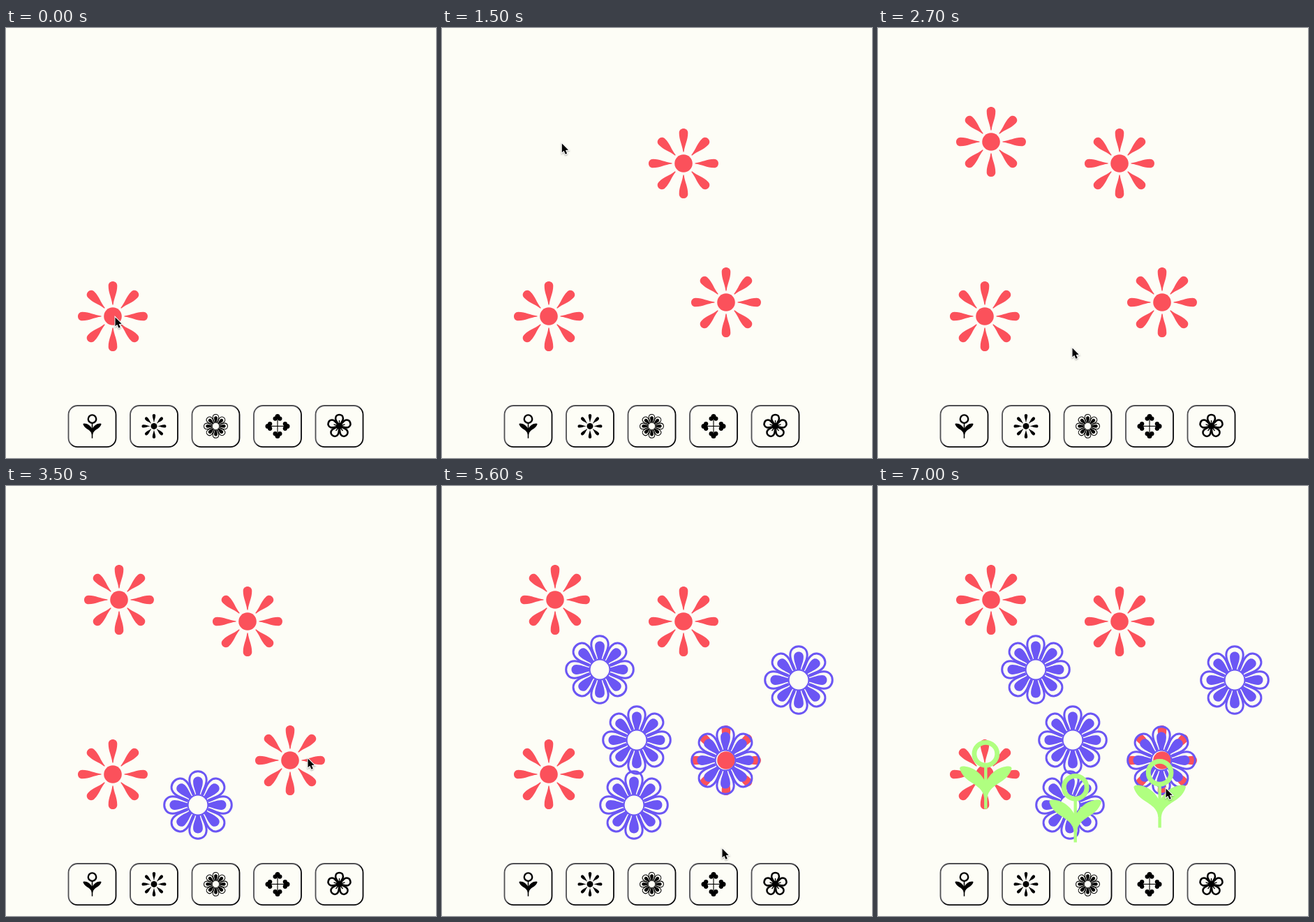
Write an HTML page with a canvas that moves like this. It is 616 px wide and 616 px high and loops after 7100 ms.

```html
<!DOCTYPE html>
<html lang="en">
<head>
<meta charset="utf-8">
<title>Flower stamps</title>
<style>
  html, body { margin: 0; width: 100%; height: 100%; overflow: hidden; background: #fdfdf6; }
  canvas { display: block; }
</style>
</head>
<body>
<canvas id="stage" width="616" height="616"></canvas>
<script>
const ctx = document.getElementById('stage').getContext('2d');
const LOOP = 7100, STEP = 100, DWELL = 150;
const PAPER = '#fdfdf6';

function disc(x, y, r) {
  ctx.beginPath();
  ctx.arc(x, y, r, 0, Math.PI * 2);
  ctx.fill();
}

function ring(x, y, r, width) {
  ctx.lineWidth = width;
  ctx.beginPath();
  ctx.arc(x, y, r, 0, Math.PI * 2);
  ctx.stroke();
}

function around(count, draw) {
  for (let i = 0; i < count; i++) {
    ctx.save();
    ctx.rotate(i * Math.PI * 2 / count);
    draw();
    ctx.restore();
  }
}

// Upright petal: `foot` wide at radius `base`, rounded at radius `tip`.
function petal(base, tip, half, foot) {
  const shoulder = tip - half, bend = (shoulder - base) * 0.4;
  const cap = tip + half / 3;
  ctx.beginPath();
  ctx.moveTo(-foot, -base);
  ctx.bezierCurveTo(-foot - half * 0.2, -base - bend, -half, -shoulder + bend, -half, -shoulder);
  ctx.bezierCurveTo(-half, -cap, half, -cap, half, -shoulder);
  ctx.bezierCurveTo(half, -shoulder + bend, foot + half * 0.2, -base - bend, foot, -base);
}

function burst() {
  disc(0, 0, 12.8);
  around(8, () => { petal(16.5, 50, 6.3, 0.6); ctx.fill(); });
}

function daisy() {
  ring(0, 0, 14.4, 2);
  around(8, () => {
    petal(14.5, 40.5, 6.9, 2.6);
    ctx.fill();
    ctx.lineWidth = 3;
    petal(14.5, 48.3, 12.2, 5.4);
    ctx.stroke();
  });
}

function sprout() {
  ring(0, -29.3, 16.4, 6.8);
  ctx.fillRect(-2.2, -13, 4.4, 62.5);
  for (const side of [-1, 1]) {
    ctx.save();
    ctx.scale(side, 1);
    ctx.beginPath();
    ctx.moveTo(0, 12);
    ctx.bezierCurveTo(6, -2, 19, -11.5, 33, -11.5);
    ctx.quadraticCurveTo(39, -11, 36.5, -6);
    ctx.bezierCurveTo(31, 8, 19, 11, 9, 20);
    ctx.quadraticCurveTo(3, 26, 2.2, 34);
    ctx.lineTo(0, 34);
    ctx.fill();
    ctx.restore();
  }
}

function cross() {
  around(4, () => {
    ctx.fillRect(-1.6, -36, 3.2, 36);
    disc(0, -40, 10);
    for (const side of [-1, 1]) disc(side * 9.5, -31, 9);
  });
}

function florette() {
  disc(0, 0, 13);
  ctx.lineWidth = 7.5;
  around(5, () => {
    ctx.fillRect(-2, -24, 4, 20);
    petal(9, 47, 15.5, 6);
    ctx.stroke();
  });
}

function stamp(shape, x, y, color, scale = 1) {
  ctx.save();
  ctx.translate(x, y);
  ctx.scale(scale, scale);
  ctx.fillStyle = ctx.strokeStyle = color;
  shape();
  ctx.restore();
}

const buttons = [sprout, burst, daisy, cross, florette];
const buttonX = i => 123.5 + i * 88.5;
const BUTTON_Y = 570.4;

function drawButtons() {
  buttons.forEach((icon, i) => {
    const x = buttonX(i), y = BUTTON_Y;
    const bevel = ctx.createLinearGradient(x - 9, y - 10, x + 9, y + 10);
    bevel.addColorStop(0.4, '#505054');
    bevel.addColorStop(0.6, '#08080a');
    ctx.strokeStyle = bevel;
    ctx.lineWidth = 1.8;
    ctx.beginPath();
    ctx.roundRect(x - 34, y - 29.4, 68, 59.2, 13);
    ctx.stroke();
    stamp(icon, x, y, '#000', 0.35);
  });
}

const inks = new Map([[burst, '#fb515b'], [daisy, '#6b56f4'], [sprout, '#b0ff80']]);

// Pointer stops: arrival time, place, and the shape left there, if any.
const stops = [
  [-DWELL, 153, 413, burst],
  [450, 407, 393, burst],
  [950, 346, 194, burst],
  [1550, 162, 163, burst],
  [2250, buttonX(2), BUTTON_Y],
  [2650, 275, 457, daisy],
  [3450, 429, 389],
  [3650, 406, 393, daisy],
  [4100, 226, 263, daisy],
  [4650, 511, 278, daisy],
  [5150, 279, 364, daisy],
  [5550, 398, 518],
  [5850, buttonX(0), BUTTON_Y],
  [6150, 154.3, 413, sprout],
  [6450, 282.7, 461, sprout],
  [6750, 403.6, 440, sprout],
  [7000, 409, 432]
];

function pointerAt(t) {
  const last = stops.findLastIndex(stop => stop[0] <= t);
  const [t0, x0, y0] = stops[last];
  const [t1, x1, y1] = stops[last + 1] ?? [LOOP, x0, y0];
  const leave = Math.min(t0 + DWELL, t1 - STEP);
  const u = Math.max(0, (t - leave) / (t1 - leave));
  const ease = u * u * (3 - 2 * u);
  return [x0 + (x1 - x0) * ease + 3.5, y0 + (y1 - y0) * ease + 1.5];
}

const arrow = new Path2D('M0 0V12.8L2.8 10.2L5 15.3L7.3 14.3L5.2 9.4L9.2 9.3Z');

function drawPointer(x, y) {
  ctx.save();
  ctx.translate(x, y);
  ctx.shadowColor = 'rgba(0,0,0,0.35)';
  ctx.shadowBlur = 2;
  ctx.shadowOffsetY = 1;
  ctx.strokeStyle = '#fff';
  ctx.lineWidth = 2;
  ctx.stroke(arrow);
  ctx.shadowColor = 'transparent';
  ctx.fillStyle = '#000';
  ctx.fill(arrow);
  ctx.restore();
}

function render(t) {
  ctx.fillStyle = PAPER;
  ctx.fillRect(0, 0, 616, 616);
  drawButtons();
  for (const [arrival, x, y, shape] of stops) {
    if (shape && t >= arrival + DWELL) stamp(shape, x, y, inks.get(shape));
  }
  drawPointer(...pointerAt(t));
}

const began = performance.now();
function tick() {
  const t = (performance.now() - began) % LOOP;
  render(Math.floor(t / STEP) * STEP);
  requestAnimationFrame(tick);
}
tick();
</script>
</body>
</html>
```
